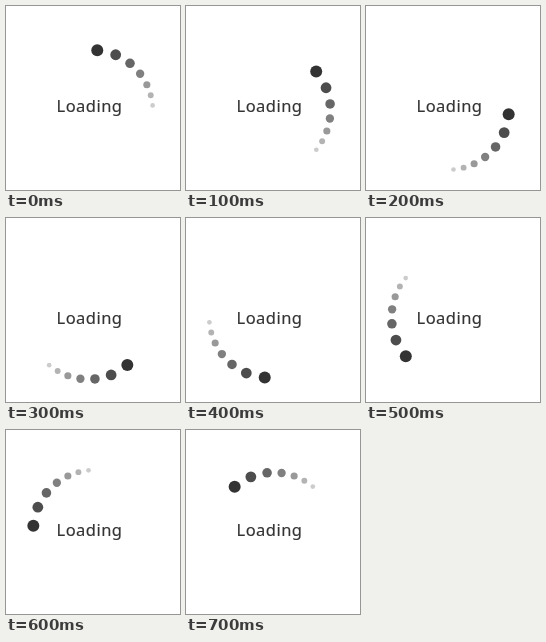
An HTML page for the animation above (0.8 s loop, 174 by 184 pixels).

```html
<!DOCTYPE html>
<html lang="en">
<head>
<meta charset="utf-8">
<title>Loading</title>
<style>
  html, body { margin: 0; width: 100%; height: 100%; overflow: hidden; background: #fff; }
  svg { display: block; width: 174px; height: 184px; }
  text { font: 16.5px "Noto Sans", "Open Sans", sans-serif; letter-spacing: 0.45px; fill: #333; stroke: #333; stroke-width: 0.15px; }
</style>
</head>
<body>
<svg viewBox="0 0 174 184">
  <g id="dots"></g>
  <text x="50.6" y="106">Loading</text>
</svg>
<script>
  const CENTER = { x: 85, y: 101.9 };
  const OUTER = 64;   // every dot touches this circle from inside
  const STEPS = 8;
  const STEP_MS = 100;
  const ANGLES = [6.2, 24.9, 41.2, 55.2, 67.5, 78.1, 87.7];

  const group = document.getElementById("dots");
  const dots = ANGLES.map((angle, i) => {
    const el = document.createElementNS("http://www.w3.org/2000/svg", "circle");
    const radius = 6 - i * 0.61;
    const grey = 51 + i * 25.5;
    el.setAttribute("r", radius);
    el.setAttribute("fill", `rgb(${grey}, ${grey}, ${grey})`);
    group.append(el);
    return { el, angle, orbit: OUTER - radius };
  });

  function draw(ms) {
    const turn = Math.floor(ms / STEP_MS) % STEPS * 360 / STEPS;
    for (const { el, angle, orbit } of dots) {
      const a = (angle + turn) * Math.PI / 180;
      el.setAttribute("cx", CENTER.x + orbit * Math.sin(a));
      el.setAttribute("cy", CENTER.y - orbit * Math.cos(a));
    }
  }

  const start = performance.now();
  function tick() {
    draw(performance.now() - start);
    requestAnimationFrame(tick);
  }
  tick();
</script>
</body>
</html>
```
